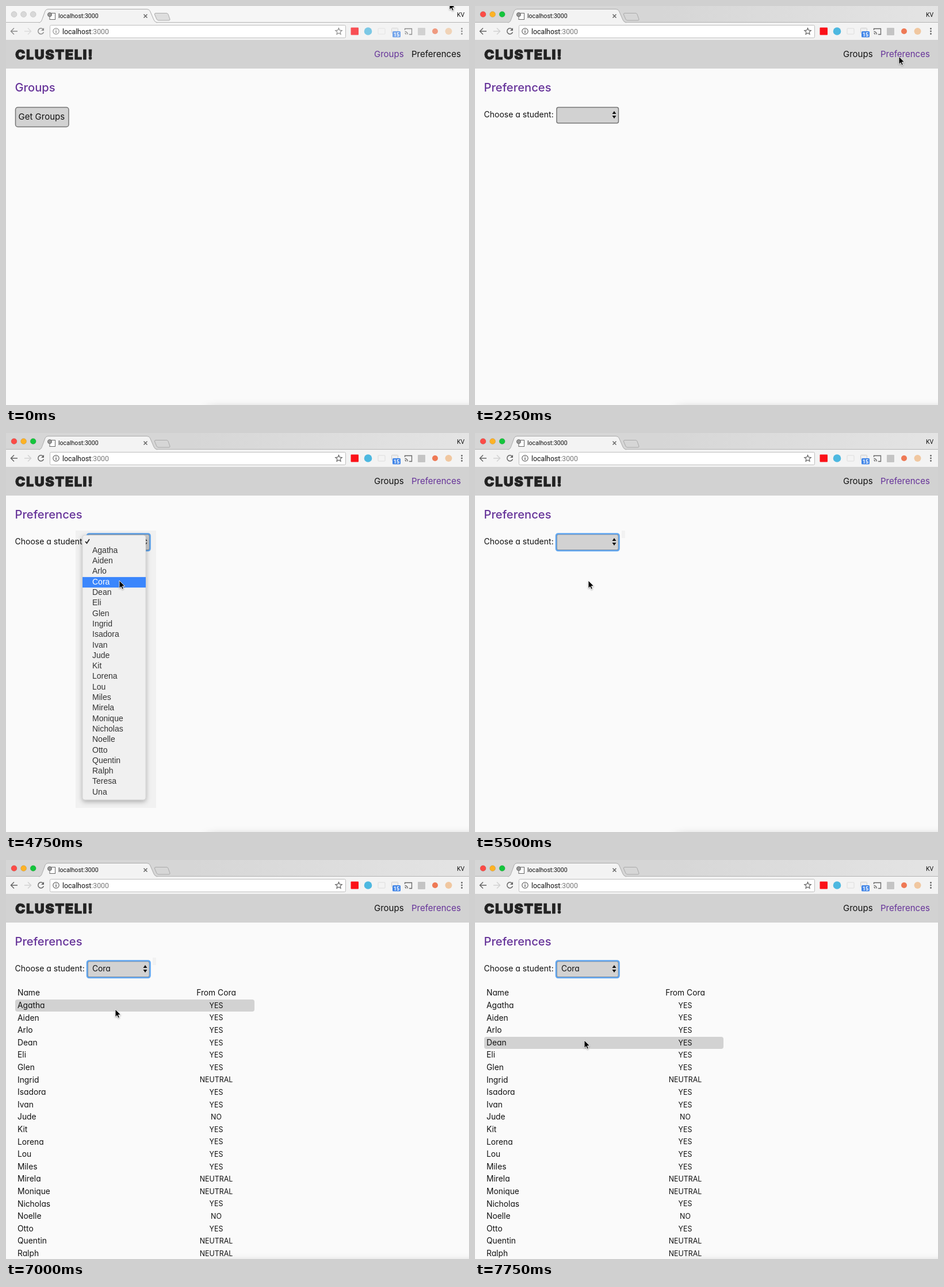
An HTML page that plays this animation: 805x695 px, repeating every 8000 ms.

```html
<!DOCTYPE html>
<html lang="en">
<head>
<meta charset="utf-8">
<title>Student preferences</title>
<style>
  html, body { margin: 0; width: 100%; height: 100%; overflow: hidden; background: #fafafa; }
  svg { display: block; font: 15px Inter, sans-serif; font-feature-settings: "cv11"; fill: #111; }
  .ui { font-family: Roboto, sans-serif; }
  .title { font-size: 20.2px; font-weight: 500; fill: rebeccapurple; }
  .brand { font-size: 23.5px; font-weight: 900; letter-spacing: 1.5px; fill: #222; stroke: #222; stroke-width: .8; }
  .label { font-size: 14px; }
  .cell { font-size: 13.8px; }
  .vote { font-size: 12.4px; text-anchor: middle; }
  .item { font: 14px "Liberation Sans", Arial, sans-serif; fill: #333; }
  .control { fill: #d2d2d2; stroke: #757575; stroke-width: 1.5; }
  .line { fill: none; stroke: #666; stroke-width: 1.5; }
</style>
</head>
<body>
<svg id="stage" width="805" height="695" viewBox="0 0 805 695">
  <defs>
    <linearGradient id="bar">
      <stop stop-color="#d6d6d6"/><stop offset=".4" stop-color="#d6d6d6"/><stop offset="1" stop-color="#e4e4e4"/>
    </linearGradient>
    <filter id="soft" x="-20%" y="-300%" width="140%" height="700%"><feGaussianBlur stdDeviation="9 6"/></filter>
    <filter id="drop" x="-20%" y="-10%" width="140%" height="120%">
      <feDropShadow dx="0" dy="3" stdDeviation="4" flood-opacity=".3"/>
    </filter>
    <filter id="small" x="-30%" y="-30%" width="180%" height="180%">
      <feDropShadow dx="0" dy="1" stdDeviation=".8" flood-opacity=".4"/>
    </filter>
  </defs>

  <!-- Browser window -->
  <rect id="titlebar" width="805" height="29"/>
  <g id="lights"></g>
  <path d="M0 28.5H805" stroke="#b4b4b4"/>
  <rect y="29" width="805" height="30" fill="#f3f3f3"/>
  <path d="M57 29C62 28 62 25 64 20L68 9Q69.500 5.500 73 5.500H245Q249 5.500 250.500 9L257 24Q258.500 28 263 29" fill="#f3f3f3" stroke="#aaa"/>
  <path id="newTab" d="M260 12.500H279Q281 12.500 282 14.500L285 23Q285.500 25 283 25H265Q263 25 262 23L258.500 15Q258 12.500 260 12.500Z" stroke="#aaa"/>
  <rect x="76" y="12.500" width="9.500" height="11" fill="#fff" stroke="#666"/>
  <circle cx="76" cy="15" r="3.500" fill="#999" stroke="#666"/>
  <text class="ui" x="91" y="21" font-size="10.600">localhost:3000</text>
  <path class="line" d="M239.500 14.500L245.500 20.500M245.500 14.500L239.500 20.500"/>
  <text class="ui" x="784" y="18.500" font-size="10.500">KV</text>

  <rect x="76.500" y="33.500" width="514" height="22" rx="2" fill="#fff" stroke="#bdbdbd"/>
  <text class="ui" x="98" y="48.500" font-size="12.300">localhost<tspan fill="#777">:3000</tspan></text>
  <g id="tools">
    <path class="line" d="M20 44H9M14 38.500L8.500 44L14 49.500"/>
    <path class="line" style="stroke:#d2d2d2" d="M32 44H43M38 38.500L43.500 44L38 49.500"/>
    <path class="line" d="M64.500 40.500A5 5 0 1 0 65.500 45.500"/>
    <path d="M66 38V43H61Z" fill="#666"/>
    <circle class="line" cx="87" cy="44" r="5.200" style="stroke-width:1.200"/>
    <path class="line" d="M87 43V47M87 40.800V42"/>
    <path class="line" style="stroke-width:1.200" d="M578.500 38.500L580.100 42.200L584.200 42.600L581.100 45.300L582 49.300L578.500 47.200L575 49.300L575.900 45.300L572.800 42.600L576.900 42.200Z"/>
    <rect x="599.500" y="37.500" width="13.500" height="13" rx="1" fill="#fb1118"/>
    <circle cx="629.500" cy="44" r="6.800" fill="#4db8e0"/>
    <rect x="647" y="39" width="12" height="10" rx="1" fill="none" stroke="#ddd"/>
    <rect x="670.500" y="38.500" width="11" height="9" rx="1" fill="#eee" stroke="#ccc"/>
    <rect x="672" y="44" width="14" height="10.500" rx="1.500" fill="#4286e8"/>
    <text class="ui" x="679" y="52.700" font-size="9" font-weight="700" text-anchor="middle" fill="#fff">15</text>
    <path class="line" style="stroke-width:1.300" d="M693.500 42V39.500H705.500V49.500H701M693.500 44.500A5 5 0 0 1 698.500 49.500M693.500 47.500A2 2 0 0 1 695.500 49.500"/>
    <rect x="716" y="38" width="13" height="13" rx="1" fill="#c4c4c4"/>
    <circle cx="746" cy="44" r="5" fill="#ee7955"/>
    <circle cx="769.500" cy="44" r="6" fill="#f0c7a0"/>
    <g fill="#666"><circle cx="792.500" cy="39.500" r="1.400"/><circle cx="792.500" cy="44" r="1.400"/><circle cx="792.500" cy="48.500" r="1.400"/></g>
  </g>

  <!-- Page header -->
  <rect y="59" width="805" height="50" fill="#d2d2d2"/>
  <text class="brand" x="16" y="92.500">CLUSTELI!</text>
  <text id="groupsLink" x="640" y="89">Groups</text>
  <text id="prefsLink" x="705" y="89">Preferences</text>

  <g id="groups">
    <text class="title" x="15.500" y="148.500">Groups</text>
    <rect class="control" x="16.500" y="176.500" width="92.500" height="34" rx="4"/>
    <text x="21.500" y="198">Get Groups</text>
  </g>

  <g id="prefs">
    <text class="title" x="15.500" y="148.500">Preferences</text>
    <text class="label" x="15.500" y="193.500">Choose a student:</text>
    <rect class="control" x="142" y="176.500" width="107.500" height="27.500" rx="3"/>
    <rect id="ring" x="141" y="175.500" width="109.500" height="29.500" rx="3.500" fill="none" stroke="#62a8f2" stroke-width="2.600"/>
    <path d="M238.500 188L242 183L245.500 188ZM238.500 191L242 196L245.500 191Z"/>
    <rect id="trace" x="255" y="170" width="6" height="13" fill="#f2f2f2"/>
    <g id="table">
      <text id="chosen" class="cell" x="150" y="193.500"></text>
      <rect id="hover" x="16" width="416" height="21" rx="4" fill="#d2d2d2"/>
      <text class="cell" x="20" y="236">Name</text>
      <text id="from" class="cell" x="365.500" y="236" text-anchor="middle"></text>
      <g id="rows"></g>
    </g>
    <g id="menu">
      <rect x="121" y="170" width="140" height="483" fill-opacity=".035"/>
      <rect x="133" y="178" width="110" height="461" rx="4" fill="#f0f0f0" stroke="#c4c4c4" stroke-width=".6" filter="url(#drop)"/>
      <rect id="pick" x="133" width="110"/>
      <path id="tick" d="M138 189L140.500 192L145 185" fill="none" stroke-width="1.700"/>
      <g id="items"></g>
    </g>
  </g>

  <rect x="352" y="697" width="500" height="12" fill-opacity=".16" filter="url(#soft)"/>
  <path id="cursor" d="M0 0V13.500L3.100 10.700L5.100 15.300L7.400 14.300L5.400 9.800H9.700Z" fill="#000" stroke="#fff" stroke-width=".9" filter="url(#small)"/>
</svg>
<script>
const $ = id => document.getElementById(id);
const show = (id, on) => $(id).style.display = on ? '' : 'none';
const set = (id, attrs) => { for (const key in attrs) $(id).setAttribute(key, attrs[key]); };
const label = (cls, x, y, text) => `<text class="${cls}" x="${x}" y="${y}">${text}</text>`;

const LOOP = 8000, ITEM = 18.3, ROW = 21.6, CHOICE = 3;
const names = ('Agatha Aiden Arlo Cora Dean Eli Glen Ingrid Isadora Ivan Jude Kit Lorena Lou ' +
  'Miles Mirela Monique Nicholas Noelle Otto Quentin Ralph Teresa Una').split(' ');
const votes = 'YYYYYY-YYNYYYY--YNY--YY';
const voteText = { Y: 'YES', N: 'NO', '-': 'NEUTRAL' };
const lightColors = ['#fc4b46', '#fdb225', '#14c53c'];

// Each step: start time, then the value held until the next one.
const cursorSteps = [[0, 771, -7], [750, 740, 94], [1000, 735, 90], [1250, 737, 88], [2750, 329, 174],
  [3000, 250, 187], [3250, 197, 191], [3500, 197, 187], [4250, 197, 203], [4500, 197, 221],
  [4750, 197, 257], [6500, 191, 244], [6750, 190, 246], [7000, 190, 260], [7250, 190, 280],
  [7500, 190, 298], [7750, 190, 314]];
const pickSteps = [[0, null], [3500, -1], [4250, 0], [4500, 1], [4750, CHOICE]];
const hoverSteps = [[0, null], [6500, 0], [7250, 1], [7500, 2], [7750, 3]];
const at = (steps, t) => steps.findLast(step => step[0] <= t).slice(1);

$('chosen').textContent = names[CHOICE];
$('from').textContent = 'From ' + names[CHOICE];
$('items').innerHTML = names.map((name, i) => label('item', 150, 208.8 + ITEM * i, name)).join('');
$('rows').innerHTML = names.filter((_, i) => i !== CHOICE).map((name, i) => {
  const y = 258 + ROW * i;
  return label('cell', 20, y, name) + label('vote', 365.5, y - .3, voteText[votes[i]]);
}).join('');
$('lights').innerHTML = lightColors.map((_, i) =>
  `<circle cx="${14 + 16.6 * i}" cy="14.500" r="5" stroke="#000" stroke-opacity=".15" stroke-width=".7"/>`).join('');

function draw(t) {
  const active = t >= 1500, onPrefs = t >= 2250, open = t >= 3250 && t < 5500;

  set('titlebar', { fill: active ? 'url(#bar)' : '#f6f6f6' });
  set('newTab', { fill: active ? '#d6d6d6' : '#dedede' });
  set('tools', { opacity: active ? 1 : .72 });
  [...$('lights').children].forEach((light, i) => light.setAttribute('fill', active ? lightColors[i] : '#d8d8d8'));

  set('groupsLink', { fill: onPrefs ? '#111' : 'rebeccapurple' });
  set('prefsLink', { fill: onPrefs ? 'rebeccapurple' : '#111' });
  show('groups', !onPrefs);
  show('prefs', onPrefs);
  show('ring', t >= 3500);
  show('menu', open);
  show('trace', t >= 5500 && t < 7500);
  show('table', t >= 5750);

  const [pick] = at(pickSteps, t), blank = pick === -1;
  show('pick', pick !== null);
  set('pick', blank
    ? { y: 181, height: 15, fill: '#1b6ff5' }
    : { y: 196 + ITEM * pick, height: ITEM, fill: '#3b86fc' });
  set('tick', { stroke: blank ? '#fff' : '#222' });
  [...$('items').children].forEach((item, i) => item.style.fill = i === pick ? '#fff' : '');

  const [row] = at(hoverSteps, t);
  show('hover', row !== null);
  set('hover', { y: Math.round(243 + ROW * row) });

  const [x, y] = at(cursorSteps, t);
  set('cursor', { transform: `translate(${x} ${y})` });
}

function tick() {
  draw(performance.now() % LOOP);
  requestAnimationFrame(tick);
}
tick();
</script>
</body>
</html>
```
